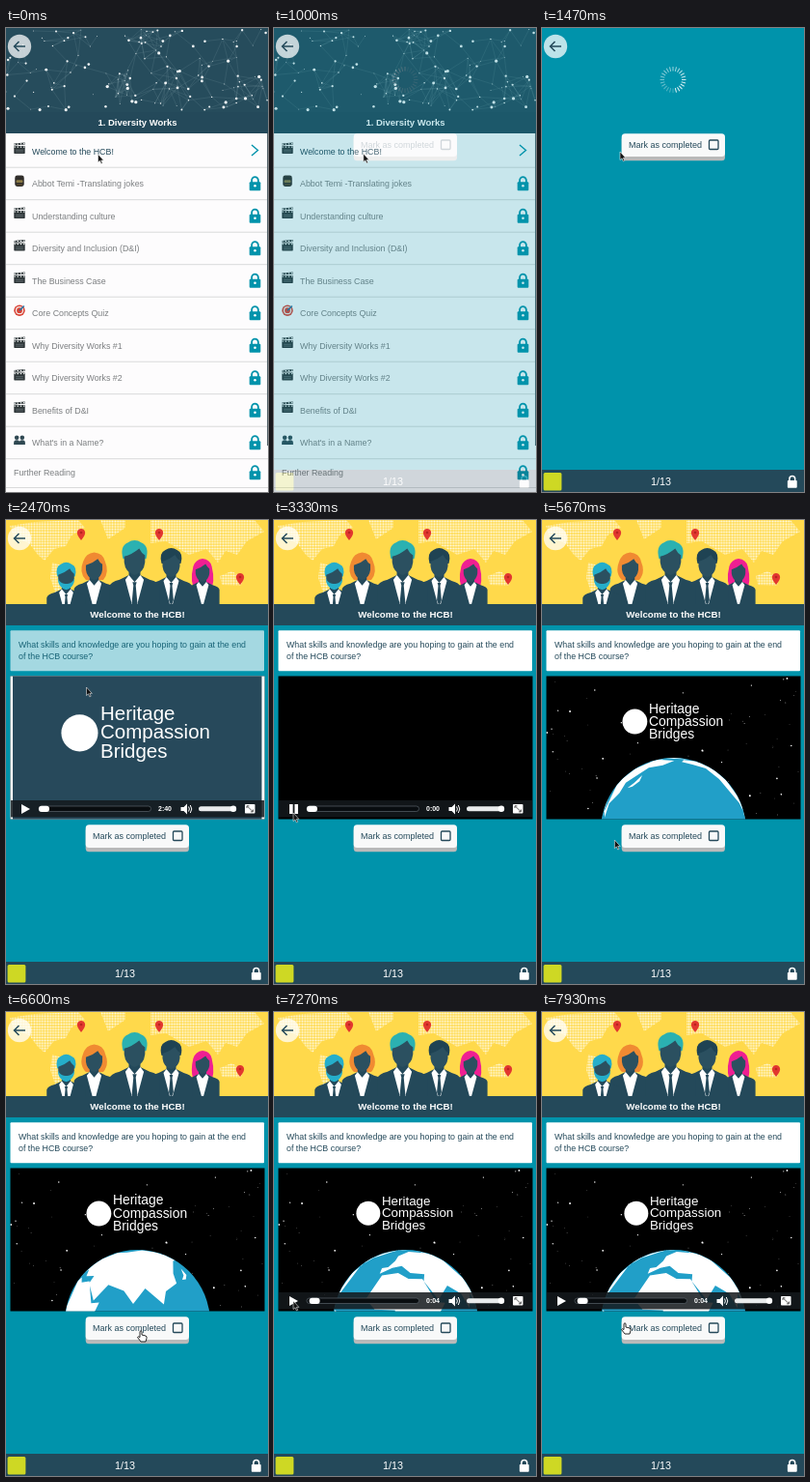
An HTML page that plays this animation: 272 px wide and 480 px high, repeating every 8000 ms.

```html
<!DOCTYPE html>
<html lang="en">
<head>
<meta charset="utf-8">
<title>Course lesson</title>
<style>
  html, body { margin: 0; width: 100%; height: 100%; overflow: hidden; background: #fff; }
  svg { display: block; width: 272px; height: 480px; font: 8.85px "Liberation Sans", Arial, sans-serif; }
</style>
</head>
<body>
<svg id="stage" viewBox="0 0 272 480"></svg>
<script>
const LOOP = 8000, NAVY = '#24495a', TEAL = '#0093ab';
const LOAD = 1900, PLAY = 3150, PAUSE = 7250;
const $ = id => document.getElementById(id);
const clamp = v => Math.max(0, Math.min(1, v));
const part = (t, a, b) => clamp((t - a) / (b - a));
const smooth = u => u * u * (3 - 2 * u);

function seeded(seed) {
  return () => (seed = (seed * 16807) % 2147483647) / 2147483647;
}
const rect = (x, y, w, h, fill, more = '') =>
  `<rect x="${x}" y="${y}" width="${w}" height="${h}" fill="${fill}" ${more}/>`;
const circle = (x, y, r, fill, more = '') =>
  `<circle cx="${x}" cy="${y}" r="${r}" fill="${fill}" ${more}/>`;
const path = (d, fill, more = '') => `<path d="${d}" fill="${fill}" ${more}/>`;
const stroke = (d, color, w, more = '') =>
  path(d, 'none', `stroke="${color}" stroke-width="${w}" ${more}`);
const text = (x, y, s, fill, more = '') => `<text x="${x}" y="${y}" fill="${fill}" ${more}>${s}</text>`;
const at = (x, y, s, body) => `<g transform="translate(${x} ${y}) scale(${s})">${body}</g>`;

const titleBar = (s, size) => rect(0, 87, 272, 22, NAVY) +
  text(136.5, 101.2, s, '#fff', `font-size="${size}" font-weight="700" text-anchor="middle"`);

const lock = (x, y, fill, hole) => at(x, y, 1,
  stroke('M-3.4 0V-2.600a3.4 3.4 0 0 1 6.8 0V0', fill, 1.8) +
  rect(-5.8, -.8, 11.6, 9, fill, 'rx="1"') + circle(0, 3.2, 1.3, hole));

const icons = {
  film: rect(-6, -2.5, 12, 8, '#2d3437', 'rx=".6"') +
    stroke('M-6 -4.5L6 -5.5M-6 -1.6H6', '#2d3437', 2.2) +
    stroke('M-6 -4.5L6 -5.5M-6 -1.6H6', '#e4e8e8', 1.3, 'stroke-dasharray="1.6 1.8"') +
    stroke('M-4 1.6H4M-4 3.6H4', '#839096', .6),
  monk: rect(-5, -6, 10, 12, '#302d2a', 'rx="2.5"') + rect(-3.5, -1, 7, 3, '#8b7a45', 'rx="1"') +
    rect(-3, 3.5, 6, 1, '#70572f'),
  target: circle(0, 0, 6, '#d94235') + circle(0, 0, 4.3, '#f4ece8') + circle(0, 0, 3, '#d94235') +
    stroke('M0 0L5 -5', '#2473a5', 1.7),
  people: [-3, 3].map(x => circle(x, -2.5, 2.4, '#2f4852') +
    path(`M${x - 3.2} 5V3q0-3 3.2-3t3.2 3V5z`, '#2f4852')).join('')
};

function constellation() {
  const rnd = seeded(73), dots = [];
  for (let i = 0; i < 150; i++) dots.push([rnd() * 276 - 2, 85 * rnd(), .4 + 1.3 * rnd() ** 1.5]);
  let lines = '';
  dots.forEach((a, i) => dots.slice(i + 1).forEach(b => {
    if (Math.hypot(a[0] - b[0], a[1] - b[1]) < 27 && rnd() < .3) lines += `M${a[0]} ${a[1]}L${b[0]} ${b[1]}`;
  }));
  return rect(0, 0, 272, 88, '#264c5c') + stroke(lines, '#9bb7bf', .35, 'opacity=".4"') +
    dots.map(d => circle(...d, '#f1f5f6')).join('');
}

function courseList() {
  const rows = [
    ['Welcome to the HCB!', 'film'], ['Abbot Temi -Translating jokes', 'monk'],
    ['Understanding culture', 'film'], ['Diversity and Inclusion (D&amp;I)', 'film'],
    ['The Business Case', 'film'], ['Core Concepts Quiz', 'target'],
    ['Why Diversity Works #1', 'film'], ['Why Diversity Works #2', 'film'],
    ['Benefits of D&amp;I', 'film'], ["What's in a Name?", 'people'], ['Further Reading']
  ];
  return rect(0, 0, 272, 480, '#fdfcfd') + constellation() + titleBar('1. Diversity Works', 9.5) +
    rows.map(([label, icon], i) => {
      const y = i < 10 ? 127.5 + i * 33.5 : 460;
      return text(icon ? 27 : 8, y + 3.2, label, i ? '#7c7f81' : NAVY) +
        (icon ? at(14, y - 2.8, .95, icons[icon]) : '') +
        (i ? lock(258.5, y - .9, TEAL, '#fff') : stroke('M255 121l6.5 5.5-6.5 5.5', TEAL, 1.4)) +
        rect(0, i < 10 ? y + 16.2 : 475, 272, 1, '#d9dadb');
    }).join('') + rect(271, 109, 1, 323, '#59686f');
}

// The eyes sit near the local origin; mane is the length of long hair, if any.
function person(x, y, s, hair, { mane = 0, beard = false } = {}) {
  const crown = 'M-10 6Q-13 -5 -6 -8Q0 -12 6 -8Q13 -5 10 6z';
  return at(x, y, s,
    (mane ? path(`M-9 ${mane}Q-17 ${mane * .6} -12 0Q-9 -9 0 -10Q10 -9 12 0Q17 ${mane * .6} 10 ${mane}z`, hair) : path(crown, hair)) +
    path('M-22 56V30Q-21 26 -13 24L-5 20V13H5V20L13 24Q21 26 22 30V56z', NAVY) +
    path('M-5 20L0 26L5 20L8 24L1 50H-1L-8 24z', '#fff') +
    (mane ? '' : path('M-1.8 26H1.8L1 29L2.4 44L0 50L-2.4 44L-1 29z', NAVY)) +
    path('M-9 4Q-2 2 4 -3Q6 1 9 3V9Q8 18 0 20Q-8 18 -9 9z', '#2b5060') +
    (beard ? path('M-9.500 8Q-9 19 0 21Q9 19 9.500 8Q6 15 0 14Q-6 15 -9.500 8z', hair) : ''));
}

const pin = (x, y) => at(x, y, 1,
  path('M0 7Q-5 1 -4 -2Q-3 -5 0 -5Q3 -5 4 -2Q5 1 0 7z', '#e2372f') + circle(0, -1, 1.3, '#b8241f'));

const banner = () => rect(0, 0, 272, 87, '#ffd94b') +
  path('M4 6L30 2L75 0L82 8L68 16L62 27L50 30L40 42L33 36L24 24L8 18zM48 44L62 48L66 58L52 78L46 60z' +
    'M98 0H124V8L106 20zM150 0H258L268 12L250 22L240 36L228 32L220 44L208 30L190 36L166 22L150 24z' +
    'M222 58L234 53L246 59L244 68L224 67z', 'url(#dots)') +
  pin(78, 14) + pin(159, 14) + pin(243, 60) +
  person(91.5, 43, .95, '#f08a32', { mane: 20 }) + person(204, 48, .8, '#ef1f92', { mane: 33 }) +
  person(62.5, 53, .92, '#25aeca', { beard: true }) + person(171.5, 39, 1, '#1f4353') + person(133.5, 33, 1.2, '#2bb1b1');

// Round badge followed by the three-line programme name.
const brand = (x, y, s, weight) => circle(x - 1.05 * s, y + .65 * s, .93 * s, '#fff') +
  ['Heritage', 'Compassion', 'Bridges'].map((word, i) =>
    text(x, y + i * .95 * s, word, '#fff', `font-size="${s}" font-weight="${weight}"`)).join('');

function stars() {
  const rnd = seeded(41);
  return Array.from({ length: 75 }, () =>
    circle(5 + rnd() * 262, 163 + rnd() * 145, .25 + .75 * rnd() ** 2, '#fff')).join('');
}

const controls = () => `<g id="controls">` + rect(5, 290, 263, 17.5, '#14191c', 'opacity=".86"') +
  path('M16 294L25 299L16 304z', '#fff', 'id="playIcon"') +
  `<g id="pauseIcon">${rect(16, 294, 3.6, 10, '#fff')}${rect(21.4, 294, 3.6, 10, '#fff')}</g>` +
  rect(34, 296, 116.5, 5.5, '#090d10', 'rx="2.7" stroke="#59636a" stroke-width=".7"') +
  rect(34, 295.7, 11, 6.2, '#fff', 'rx="3" id="knob"') +
  text(158, 301.2, '2:40', '#fff', 'id="clock" font-size="7" font-weight="700"') +
  path('M181.500 297H184.500L188 293.500V304.500L184.500 301H181.500z', '#fff') +
  stroke('M189.500 296.500q1.800 2.500 0 5M191.300 295q3 4 0 8', '#fff', 1) +
  rect(200, 296.3, 38, 5, '#e9ebec', 'rx="2.5"') + circle(236, 298.8, 3.2, '#fff') +
  rect(248, 294, 10.5, 9.5, '#fff', 'rx=".8"') +
  stroke('M250 298V295.800H252.500M256.500 299.500V301.800H254M250.500 296.200L256 301.400', '#333', .8) + '</g>';

const video = () => rect(4.5, 161.5, 264, 148, '#000') +
  `<g id="poster">${rect(4.5, 161.5, 264, 148, '#fff')}${rect(7, 161.5, 258.5, 148, '#27495b')}${brand(98, 207, 20.5, 400)}</g>` +
  `<g clip-path="url(#screen)"><g id="space">${stars()}
    <circle id="sea" cx="136.5" fill="#219fc8"/>
    <g clip-path="url(#globe)"><path id="land" fill="#fff"/></g>
    <g id="brand">${brand(111, 199.5, 13.9, 400)}</g></g></g>` + controls();

function lesson() {
  let ticks = '';
  for (let i = 0; i < 24; i++)
    ticks += stroke('M0 -9V-13.500', '#fff', 1, `class="tick" transform="rotate(${i * 15})"`);
  return rect(0, 0, 272, 480, TEAL) +
    `<g id="spinner" transform="translate(136 53.5)">${ticks}</g>
    <g id="content">${banner()}${titleBar('Welcome to the HCB!', 9.7)}
      <g id="card">${rect(4.5, 114.3, 263.5, 42, '#fff', 'rx="1"')}
        ${text(13, 132, 'What skills and knowledge are you hoping to gain at the end', NAVY)}
        ${text(13, 144.3, 'of the HCB course?', NAVY)}</g>
      ${video()}</g>
    <g id="button">${rect(82.7, 112, 107.3, 25.3, '#b9b9b9', 'rx="3.5"')}${rect(82.7, 109.3, 107.3, 23.7, '#f8f9f9', 'rx="3.5"')}
      ${text(90, 124.4, 'Mark as completed', NAVY, 'font-size="9"')}
      ${rect(173.5, 116, 9.5, 9.5, 'none', `rx="1" stroke="${NAVY}" stroke-width="1.3"`)}</g>` +
    rect(0, 457, 272, 23, NAVY) + rect(1.6, 460, 18.8, 18.5, '#ced824', 'rx="1.5"') +
    text(123.5, 473, '1/13', '#fff', 'font-size="10.8" text-anchor="middle"') + at(259.8, 468.7, .85, lock(0, 0, '#fff', '#fff'));
}

$('stage').innerHTML = `<defs>
  <pattern id="dots" width="2.8" height="2.8" patternUnits="userSpaceOnUse">${circle(1.4, 1.4, 1.05, '#fffdf0')}</pattern>
  <clipPath id="screen">${rect(4.5, 161.5, 264, 148, '#000')}</clipPath>
  <clipPath id="globe"><circle id="globeClip" cx="136.5"/></clipPath></defs>
  ${courseList()}<g id="lesson">${lesson()}</g>
  ${circle(14, 19, 12.2, '#fff', 'opacity=".74"')}${stroke('M20 19H9M13.500 14L8.500 19L13.500 24', NAVY, 1.5)}
  <g id="cursor">
    <path id="arrow" d="M0 0V9.500L2.200 7.600L3.700 11L5.200 10.300L3.700 7.100H6.500z" fill="#111" stroke="#fff" stroke-width=".6" transform="scale(.9)"/>
    <path id="hand" d="M-1 1Q0 -.5 1 1V4.500L5 5.500Q6.500 6 6 8L5 11.500H0L-3.500 7Q-3 5.500 -1 7z" fill="#fff" stroke="#111" stroke-width=".9"/>
  </g>`;

// Simplified coastlines, as longitude,latitude pairs.
const coasts = [
  '-166,65 -156,71 -125,70 -95,72 -82,68 -94,60 -81,53 -78,62 -65,58 -55,50 -70,43 -81,30 -81,25 -90,30 -97,25 -95,18 -87,21 -83,10 -92,14 -106,21 -124,42 -131,55 -150,60',
  '-55,82 -20,80 -22,70 -44,60 -54,70',
  '-78,0 -77,8 -60,9 -48,0',
  '-9,37 -9,43 -2,44 4,52 6,60 25,71 60,69 100,77 140,73 180,68 162,58 142,55 122,38 121,28 108,20 105,9 98,15 90,22 80,9 72,20 57,26 45,13 34,29 36,36 22,37 13,45 3,43',
  '-6,35 10,37 20,31 33,31 43,11 51,11 42,-4 9,-4 9,4 -8,5 -17,14',
  '130,32 136,37 141,45 142,38 136,33'
].map(s => s.split(' ').map(p => p.split(',').map(v => v * Math.PI / 180)));

function globePath(lon0, r, cy) {
  const tilt = -6 * Math.PI / 180;
  return coasts.map(coast => {
    const pts = coast.map(([lon, lat]) => {
      const d = lon - lon0;
      let x = Math.cos(lat) * Math.sin(d);
      let y = Math.cos(tilt) * Math.sin(lat) - Math.sin(tilt) * Math.cos(lat) * Math.cos(d);
      const z = Math.sin(tilt) * Math.sin(lat) + Math.cos(tilt) * Math.cos(lat) * Math.cos(d);
      if (z < 0) { const n = Math.hypot(x, y); x /= n; y /= n; }
      return { z, xy: `${(136.5 + x * r).toFixed(1)} ${(cy - y * r).toFixed(1)}` };
    });
    return pts.some(p => p.z > 0) ? 'M' + pts.map(p => p.xy).join('L') + 'z' : '';
  }).join('');
}

const moves = [
  [0, 95.5, 130.5], [850, 95.5, 130.5], [1400, 81, 128], [1900, 81, 128], [2400, 83.5, 173], [2550, 83.5, 173],
  [3050, 20, 303], [3700, 20, 303], [4450, 37.5, 332], [5300, 37.5, 332], [6200, 140, 329.5], [6700, 140, 329.5],
  [7200, 20, 299], [7450, 20, 299], [7900, 86, 321.5], [LOOP, 86, 321.5]
];
function pointer(t) {
  const i = moves.findIndex((m, k) => k && m[0] > t);
  const a = moves[i - 1], b = moves[i], u = smooth(part(t, a[0], b[0]));
  return [a[1] + (b[1] - a[1]) * u, a[2] + (b[2] - a[2]) * u];
}

const show = (id, on) => $(id).setAttribute('opacity', +on);
const move = (id, value) => $(id).setAttribute('transform', value);
const ticks = document.querySelectorAll('.tick');

function drawSpace(t) {
  show('space', part(t, 3500, 3750));
  const film = Math.min(t, PAUSE), rise = 1 - (1 - part(film, 3700, 5600)) ** 2;
  const r = 38 + 37.5 * rise, cy = 315 - 69 * rise + r;
  for (const id of ['sea', 'globeClip']) {
    $(id).setAttribute('r', r);
    $(id).setAttribute('cy', cy);
  }
  const lon = -100 - 102 * (film - 4870) / 1000;
  $('land').setAttribute('d', globePath(lon * Math.PI / 180, r, cy));
  const drop = 70 * (smooth(part(film, 4700, 5600)) - 1);
  const size = 1 - .036 * part(film, 6600, PAUSE);
  move('brand', `translate(137 ${200 + drop}) scale(${size}) translate(-137 -200)`);
}

function draw(t) {
  const loaded = t >= LOAD, started = t >= PLAY, playing = started && t < PAUSE;
  show('lesson', part(t, 950, 1200));
  show('spinner', !loaded);
  ticks.forEach((tick, i) => tick.setAttribute('opacity', .25 + .7 * ((i / 24 - t / 1000 + 9) % 1)));
  show('content', loaded);
  show('card', part(t, 2150, 2650));
  move('button', `translate(0 ${loaded ? 206 : 0})`);

  show('poster', !started);
  drawSpace(t);
  show('controls', Math.max(1 - part(t, 4400, 4600), part(t, 6950, 7100)));
  show('playIcon', !playing);
  show('pauseIcon', playing);
  const seconds = started ? Math.floor((Math.min(t, PAUSE) - PLAY) / 1000 + .05) : 0;
  $('clock').textContent = started ? `0:0${seconds}` : '2:40';
  $('knob').setAttribute('x', 34 + seconds * .65);

  const [x, y] = pointer(t);
  const overButton = loaded && x > 82 && x < 190 && y > 315 && y < 343;
  move('cursor', `translate(${x} ${y})`);
  show('arrow', !overButton);
  show('hand', overButton);
}

const start = performance.now();
function frame() {
  draw((performance.now() - start) % LOOP);
  requestAnimationFrame(frame);
}
frame();
</script>
</body>
</html>
```
